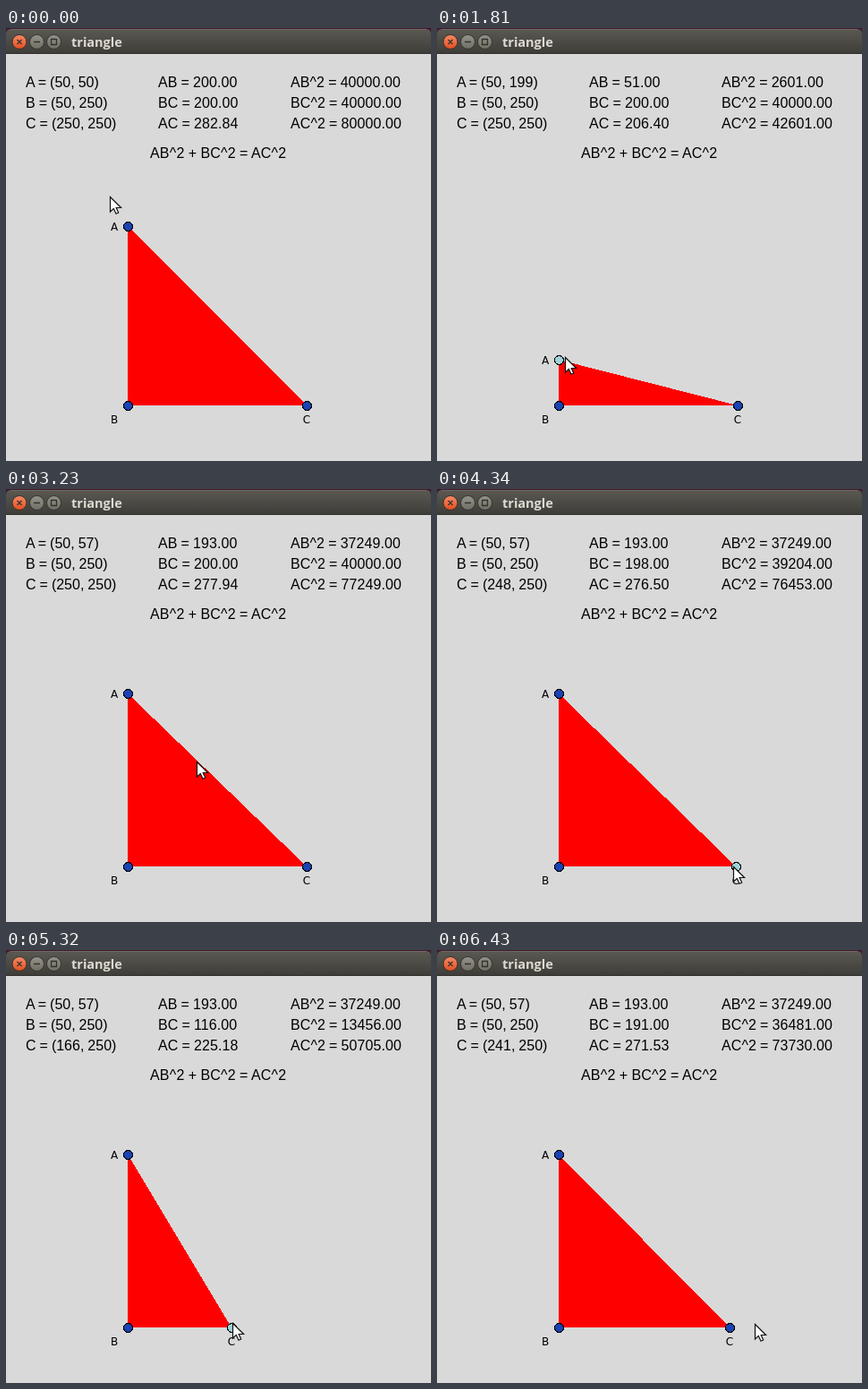
Write an HTML page that moves like this. It is 475 by 483 pixels and loops after 6530 ms.

```html
<!DOCTYPE html>
<html lang="en">
<head>
<meta charset="utf-8">
<title>triangle</title>
<style>
  html, body { margin: 0; width: 100%; height: 100%; overflow: hidden; background: #d9d9d9; }
  #stage { position: relative; width: 475px; height: 483px; overflow: hidden; }
  svg { position: absolute; left: 0; top: 0; }
  .col { position: absolute; top: 49px; white-space: pre; color: #000; word-spacing: -.45px;
         font: 16px/23px "Liberation Sans", Arial, sans-serif; }
  #sides, #squares { letter-spacing: .08px; }
  #theorem { letter-spacing: .2px; }
  .title { font: 700 14.5px "Open Sans", "Noto Sans", sans-serif; fill: #dfdbd2; }
  .label { font: 12px "DejaVu Sans", sans-serif; text-anchor: middle; fill: #000; }
  .point { stroke: #000; fill: #1a43b4; shape-rendering: crispEdges; }
  .point.hot { fill: #a0d2d8; }
</style>
</head>
<body>
<div id="stage">
  <div class="col" id="points" style="left:22px"></div>
  <div class="col" id="sides" style="left:170px"></div>
  <div class="col" id="squares" style="left:318px"></div>
  <div class="col" id="theorem" style="left:161px;top:128px">AB^2 + BC^2 = AC^2</div>
  <svg width="475" height="483" viewBox="0 0 475 483">
    <defs>
      <linearGradient id="bar" x2="0" y2="1">
        <stop offset="0" stop-color="#5b5952"/>
        <stop offset="1" stop-color="#3d3c38"/>
      </linearGradient>
      <linearGradient id="orange" x2="0" y2="1">
        <stop offset="0" stop-color="#f58a66"/>
        <stop offset="1" stop-color="#e24e1f"/>
      </linearGradient>
      <linearGradient id="grey" x2="0" y2="1">
        <stop offset="0" stop-color="#96948a"/>
        <stop offset="1" stop-color="#6f6d64"/>
      </linearGradient>
    </defs>

    <rect width="475" height="12" fill="#42172f"/>
    <path d="M0 29V7Q0 1 6 1H469Q475 1 475 7V29Z" fill="url(#bar)"/>
    <path d="M5 1.5H470" stroke="#6b6961"/>
    <path d="M0 28.5H475" stroke="#33322e"/>
    <g stroke="#33312c">
      <circle cx="15" cy="15.5" r="8" fill="url(#orange)"/>
      <circle cx="34.5" cy="15.5" r="8" fill="url(#grey)"/>
      <circle cx="53.5" cy="15.5" r="8" fill="url(#grey)"/>
      <path d="M12.5 13l5 5m0-5l-5 5M31 15.5h7M50.5 12.5h6v6h-6z" fill="none" stroke-width="1.3"/>
    </g>
    <text class="title" x="73" y="20.5">triangle</text>

    <polygon id="tri" fill="#f00" shape-rendering="crispEdges"/>
    <circle class="point" id="dotA" r="5" cx="136.5"/>
    <circle class="point" r="5" cx="136.5" cy="421.5"/>
    <circle class="point" id="dotC" r="5" cy="421.5"/>
    <text class="label" id="nameA" x="121">A</text>
    <text class="label" x="121" y="441">B</text>
    <text class="label" id="nameC" y="441">C</text>
    <path id="cursor" d="M.5 .5V17L4.3 13.4L7 19.2L9.7 18L7.2 12.5H12.6Z"
          fill="#fff" stroke="#111" stroke-width="1.2"/>
  </svg>
</div>
<script>
const LOOP = 6530, STEP = 60;  // the window repaints every STEP ms
const OX = 86, OY = 171;       // screen position of the drawing's origin
const LEAD = 20;               // the pointer runs ahead of the point it drags
const $ = id => document.getElementById(id);

// Monotone cubic through [time, value] keys, at rest at both ends
function track(...keys) {
  const last = keys.length - 1;
  const slope = i => (keys[i + 1][1] - keys[i][1]) / (keys[i + 1][0] - keys[i][0]);
  const tangent = i => {
    if (i === 0 || i === last) return 0;
    const a = slope(i - 1), b = slope(i);
    return a * b <= 0 ? 0 : 2 * a * b / (a + b);
  };
  return t => {
    if (t <= keys[0][0]) return keys[0][1];
    if (t >= keys[last][0]) return keys[last][1];
    const i = keys.findLastIndex(key => key[0] <= t);
    const [t0, v0] = keys[i], [t1, v1] = keys[i + 1];
    const h = t1 - t0, u = (t - t0) / h, w = 1 - u;
    return v0 * w * w * (1 + 2 * u) + v1 * u * u * (3 - 2 * u)
      + h * u * w * (tangent(i) * w - tangent(i + 1) * u);
  };
}

const dragA = { from: 870, to: 2820 }, dragC = { from: 4268, to: 6180 };
const within = (t, drag) => t >= drag.from && t < drag.to;

const pointA = track([dragA.from, 50], [1680, 206], [1800, 199], [2340, 75], [2580, 57]);
const pointC = track([dragC.from, 250], [4950, 135], [5120, 135], [5280, 166], [dragC.to, 241]);
const handX = track([50, 116], [580, 137], [900, 137], [1800, 143], [2340, 134],
  [dragA.to, 134], [3660, 335], [dragC.from, 335], [dragC.to, 326], [6420, 355]);
const handY = track([50, 188], [580, 220], [dragA.to, 227], [3660, 421],
  [dragC.from, 421], [5280, 416], [6420, 417]);

const mouseX = t => Math.round(within(t, dragC) ? OX - 1 + pointC(t + LEAD) : handX(t));
const mouseY = t => Math.round(within(t, dragA) ? OY - 1 + pointA(t + LEAD) : handY(t));

const set = (id, attrs) => {
  for (const name in attrs) $(id).setAttribute(name, attrs[name]);
};

function write(a, c) {
  const ab = 250 - a, bc = c - 50, sq = [ab * ab, bc * bc, ab * ab + bc * bc];
  const names = ["AB", "BC", "AC"];
  $("points").textContent = `A = (50, ${a})\nB = (50, 250)\nC = (${c}, 250)`;
  $("sides").textContent = names.map((s, i) => `${s} = ${Math.sqrt(sq[i]).toFixed(2)}`).join("\n");
  $("squares").textContent = names.map((s, i) => `${s}^2 = ${sq[i].toFixed(2)}`).join("\n");
}

function render(now) {
  const t = Math.floor(now % LOOP / STEP) * STEP;
  const a = pointA(t), c = pointC(t), mx = mouseX(t), my = mouseY(t);
  const ay = OY + Math.round(a), cx = OX + Math.round(c);
  const near = (x, y) => Math.hypot(mx - x - .5, my - y - .5) < 6;

  write(Math.floor(a), Math.floor(c));
  set("tri", { points: `136,${ay} 136,421 ${cx},421` });
  set("dotA", { cy: ay + .5 });
  set("dotC", { cx: cx + .5 });
  set("nameA", { y: ay + 5 });
  set("nameC", { x: cx });
  set("cursor", { transform: `translate(${mx} ${my})` });
  $("dotA").classList.toggle("hot", within(t, dragA) || near(136, ay));
  $("dotC").classList.toggle("hot", within(t, dragC) || near(cx, 421));
}

let begin;
function tick(now) {
  begin ??= now;
  render(now - begin);
  requestAnimationFrame(tick);
}
render(0);
requestAnimationFrame(tick);
</script>
</body>
</html>
```
